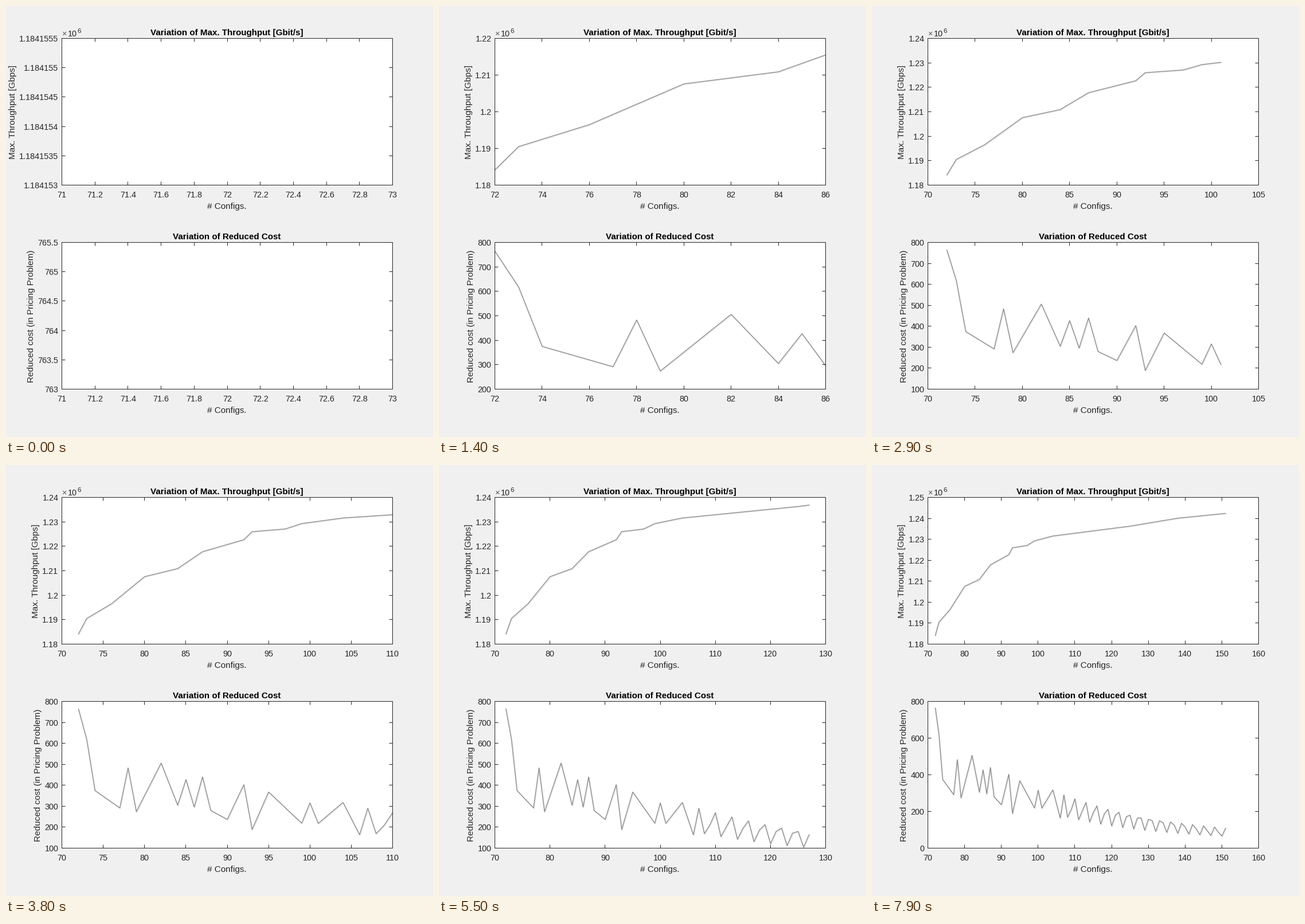
A matplotlib script that plays this animation: 745x752 px, repeating every 8 s.

```python
import math

import matplotlib.pyplot as plt
import numpy as np
from matplotlib.animation import FuncAnimation

W, H = 745, 752
FRAMES, INTERVAL = 80, 100
PX = 0.72  # points per pixel at 100 dpi
LEFT, RIGHT, HEIGHT = 97.5, 674.5, 256
MIDDLE = 385.5
INK = "#262626"

plt.rcParams["font.family"] = "Liberation Sans"

configs = np.arange(72, 72 + FRAMES)


def through(*points):
    """Values at every config on straight lines between key points."""
    return np.interp(configs, *zip(*points))


throughput = 1000 * through(
    (72, 1184.1542), (73, 1190.5), (76, 1196.5), (80, 1207.6), (84, 1210.9),
    (87, 1217.8), (92, 1222.7), (93, 1226), (97, 1227.1), (99, 1229.3),
    (104, 1231.6), (125, 1236.3), (138, 1240.1), (151, 1242.4))

# The cost starts with irregular peaks, then settles into a decaying zigzag.
peaks = through(
    (72, 764.2), (73, 618), (74, 375), (77, 292), (78, 483), (79, 274),
    (82, 506), (84, 305), (85, 427), (86, 296), (87, 440), (88, 280),
    (90, 237), (92, 403), (93, 189), (95, 368), (99, 219), (100, 316),
    (101, 218), (104, 318), (106, 164))
zigzag = 1 + 0.3 * np.cos(2 * np.pi * (configs - 95) / 2.957)
settled = 265 * np.exp((100 - configs) / 45) * zigzag
cost = np.where(configs <= 106, peaks, settled)

fig = plt.figure(figsize=(W / 100, H / 100), dpi=100, facecolor="#f0f0f0")
ax = fig.add_axes([0, 0, 1, 1])


def nice_ticks(values, max_intervals):
    """Smallest 1-2-5 step whose rounded-out limits need few enough intervals."""
    lo, hi = min(values), max(values)
    if lo == hi:
        lo, hi = lo - 1, hi + 1
    for power in range(-2, 7):
        for base in (1, 2, 5):
            step = base * 10.0 ** power
            first = math.floor(lo / step + 1e-9)
            last = math.ceil(hi / step - 1e-9)
            if last - first <= max_intervals:
                return np.arange(first, last + 1) * step


def text(x, y, s, size=14.4, color=INK, **kw):
    kw = {"ha": "center", "va": "baseline", **kw}
    ax.text(x, y, s, fontsize=size * PX, color=color, **kw)


def stroke(x, y, color=INK, width=1.0, **kw):
    ax.plot(x, y, color=color, lw=width * PX, snap=False, **kw)


def tick(x, y, dx, dy):
    """A short line from the box edge, centred on a whole pixel."""
    x, y = (math.floor(v + 1e-6) + 0.5 for v in (x, y))
    stroke([x, x + dx], [y, y + dy], solid_capstyle="butt")


def draw_chart(top, values, title, ylabel, scale=1):
    bottom = top + HEIGHT
    xs = configs[:len(values)]
    xticks, yticks = nice_ticks(xs, 10), nice_ticks(values, 7)

    def to_x(v):
        return LEFT + (v - xticks[0]) / (xticks[-1] - xticks[0]) * (RIGHT - LEFT)

    def to_y(v):
        return bottom - (v - yticks[0]) / (yticks[-1] - yticks[0]) * HEIGHT

    ax.fill([LEFT, RIGHT, RIGHT, LEFT], [top, top, bottom, bottom],
            color="white", lw=0, snap=False)
    if len(values) > 1:
        px, py = to_x(xs), to_y(values)
        stroke(px + 1, py + 1, "#e4e4e4", 2.1, solid_joinstyle="round")
        stroke(px, py, "#808080", 1.15, solid_joinstyle="round")

    stroke([LEFT, RIGHT, RIGHT, LEFT, LEFT], [top, top, bottom, bottom, top],
           solid_joinstyle="miter", solid_capstyle="projecting")
    for v in xticks:
        x = to_x(v)
        tick(x, bottom, 0, -6)
        tick(x, top, 0, 6)
        text(x, bottom + 21.5, f"{v:.8g}")

    labels = [f"{v / scale:.8g}" for v in yticks]
    for v, label in zip(yticks, labels):
        y = to_y(v)
        tick(LEFT, y, 6, 0)
        tick(RIGHT, y, -6, 0)
        text(91.5, y + 5.5, label, ha="right")

    label_width = max(8 * len(s) - 4 * s.count(".") for s in labels)
    text(84 - label_width, top + 128.5, ylabel, 15.2, rotation=90, rotation_mode="anchor")
    text(MIDDLE, bottom + 41.5, "# Configs.", 15.2)
    text(MIDDLE, top - 5.5, title, 15.1, "black", weight="bold")


def draw(frame):
    ax.clear()
    ax.set(xlim=(0, W), ylim=(H, 0))
    ax.axis("off")
    n = frame + 1
    draw_chart(56.5, throughput[:n], "Variation of Max. Throughput [Gbit/s]",
               "Max. Throughput [Gbps]", 1e6)
    text(98, 53, "×", ha="left", color="#555555")
    text(108, 53, "10", ha="left")
    text(124, 47, "6", 11.5, ha="left")
    draw_chart(412.5, cost[:n], "Variation of Reduced Cost",
               "Reduced cost (in Pricing Problem)")
    return []


anim = FuncAnimation(fig, draw, frames=FRAMES, interval=INTERVAL,
                     init_func=lambda: draw(0), repeat=True, repeat_delay=0)
plt.show()
```
